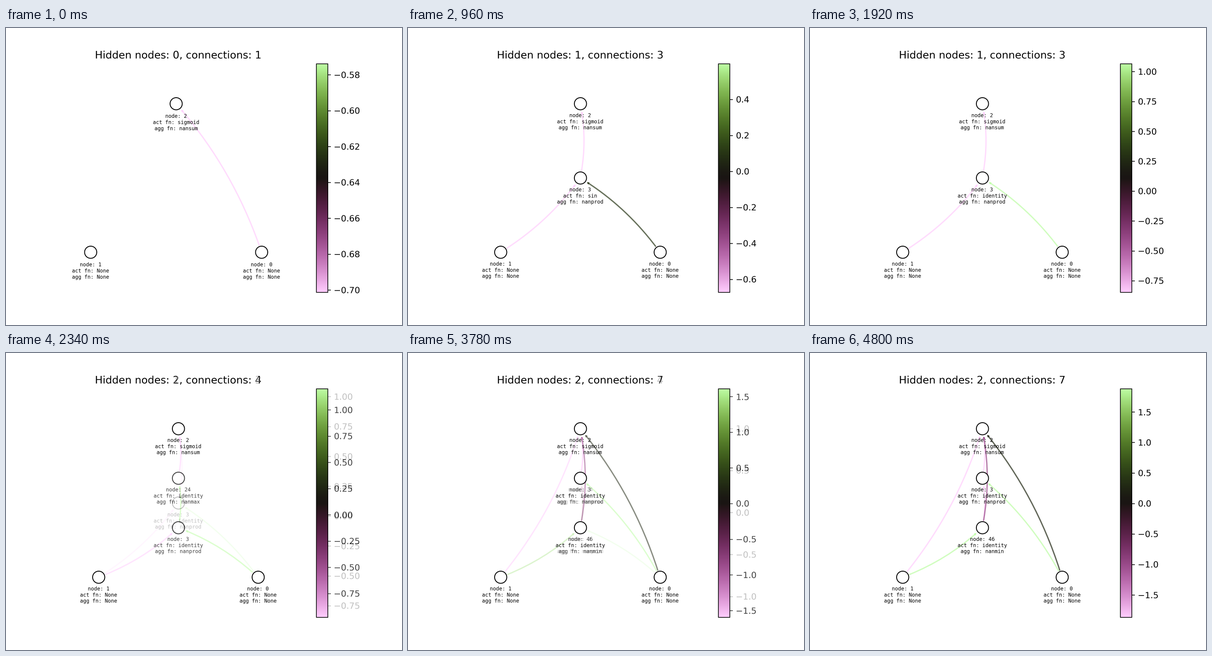
These frames come from a looping animation (864 by 648 pixels, 6.8 s). A matplotlib script:

```python
import numpy as np
import matplotlib.pyplot as plt
from matplotlib.animation import FuncAnimation
from matplotlib.cm import ScalarMappable
from matplotlib.colors import ListedColormap, Normalize
from matplotlib.patches import FancyArrowPatch

W, H, DPI, SS = 864, 648, 135, 2          # SS: supersampling of the drawings
STEP, LOOP = 20, 6800                     # ms
HOLD, FADE, FADE_STEPS = 300, 60, 4
PERIOD = HOLD + (FADE_STEPS - 1) * FADE

plt.rcParams["font.family"] = "DejaVu Sans"

# nodes fill the plot area less the margins
AREA_W, AREA_H = 0.775 * 0.8 * W, 0.77 * H
CX, CY = 0.125 * W + AREA_W / 2, 0.505 * H
HALF_X, HALF_Y = AREA_W / 3.08, AREA_H / 3.08

PINK, GREEN = 0.0, 1.0


def ramp(d, end, power):
    """From near black to the end colour, each channel with its own power."""
    dark = np.array([26, 21, 19])
    return (dark + (np.array(end) - dark) * d[:, None] ** np.array(power)) / 255


d = np.linspace(0, 1, 128)
CMAP = ListedColormap(np.vstack([
    ramp(d[::-1], (255, 205, 253), (0.95, 2, 1.1)),
    ramp(d, (189, 253, 165), (1.65, 1.3, 3))]))


def graph(hidden, edges, cx=CX, dx=HALF_X):
    """hidden: (id, activation, aggregation) from top to bottom;
    edges: (from, to, position on the colour map)."""
    top, bottom = CY - HALF_Y, CY + HALF_Y
    gap = (bottom - top) / (len(hidden) + 1)
    nodes = {0: (cx + dx, bottom, "None", "None"),
             1: (cx - dx, bottom, "None", "None"),
             2: (cx, top, "sigmoid", "nansum")}
    for i, (key, act, agg) in enumerate(hidden, 1):
        nodes[key] = (cx, top + i * gap, act, agg)
    return nodes, edges, 37.7 + 0.0102 * gap


def fork(act, tone):
    return graph([(3, act, "nanprod")],
                 [(0, 3, tone), (3, 2, PINK), (1, 3, PINK)])


wide = dict(cx=371.1, dx=186.6)
direct = graph([], [(0, 2, PINK)], **wide)
split = graph([(3, "sigmoid", "nanmean")],
              [(0, 3, 0.83), (3, 2, PINK)], **wide)
chain = graph([(24, "identity", "nanmax"), (3, "identity", "nanprod")],
              [(0, 3, GREEN), (1, 3, PINK), (3, 24, GREEN), (24, 2, PINK)])
full = graph([(3, "identity", "nanprod"), (46, "identity", "nanmin")],
             [(0, 3, GREEN), (3, 2, PINK), (1, 46, GREEN), (46, 3, PINK),
              (1, 2, PINK), (46, 2, 0.235), (0, 2, 0.57)])

# graph, generations it lasts, weight range at its start
STORY = [
    (direct, 1, -0.7013, -0.5738),
    (split, 1, -0.508, 0.8475),
    (fork("sin", 0.61), 1, -0.672, 0.599),
    (fork("identity", GREEN), 2, -0.711, 0.931),
    (chain, 3, -0.976, 1.203),
    (full, 3, -1.595, 1.611),
]
DRIFT = 0.136                             # growth of the range per generation

fig = plt.figure(figsize=(W / DPI, H / DPI), dpi=DPI, facecolor="white")


def draw_scene(net, lo, hi):
    nodes, edges, drop = net
    ax = fig.add_subplot()
    ax.axis("off")
    ax.set_title(f"Hidden nodes: {len(nodes) - 3}, connections: {len(edges)}")
    fig.colorbar(ScalarMappable(Normalize(lo, hi), CMAP), ax=ax)

    px = fig.add_axes([0, 0, 1, 1])
    px.set(xlim=(0, W), ylim=(H, 0))
    px.axis("off")
    for a, b, tone in edges:
        px.add_patch(FancyArrowPatch(
            nodes[a][:2], nodes[b][:2], arrowstyle="-|>", mutation_scale=3,
            connectionstyle="arc3,rad=0.1", shrinkA=8.66, shrinkB=8.66,
            color=CMAP(tone), alpha=0.7, linewidth=1.5, zorder=1))
    for key, (x, y, act, agg) in nodes.items():
        px.scatter(x, y, s=200, facecolor="white", edgecolor="black",
                   linewidth=1, zorder=2)
        px.text(x, y + drop, f"node: {key}\nact fn: {act}\nagg fn: {agg}",
                family="DejaVu Sans Mono", size=6, ha="center", va="center",
                zorder=3)


def render(net, lo, hi):
    """Draw one scene enlarged and average it down to the stage."""
    fig.clear()
    draw_scene(net, lo, hi)
    fig.canvas.draw()
    big = np.asarray(fig.canvas.buffer_rgba())[..., :3]
    return big.reshape(H, SS, W, SS, 3).mean(axis=(1, 3))


fig.set_dpi(DPI * SS)
shots = [render(net, lo - k * DRIFT, hi + k * DRIFT)
         for net, count, lo, hi in STORY for k in range(count)]
fig.clear()
fig.set_dpi(DPI)
stage = fig.figimage(shots[0].astype(np.uint8))


def update(i):
    t = i * STEP
    n = min(t // PERIOD, len(shots) - 1)
    local = t - n * PERIOD
    pic = shots[n]
    if n < len(shots) - 1 and local >= HOLD:
        mix = ((local - HOLD) // FADE + 1) / FADE_STEPS
        pic = (1 - mix) * pic + mix * shots[n + 1]
    stage.set_data(np.rint(pic).astype(np.uint8))
    return [stage]


anim = FuncAnimation(fig, update, frames=LOOP // STEP, interval=STEP,
                     init_func=lambda: update(0), repeat=True, repeat_delay=0)
plt.show()
```
